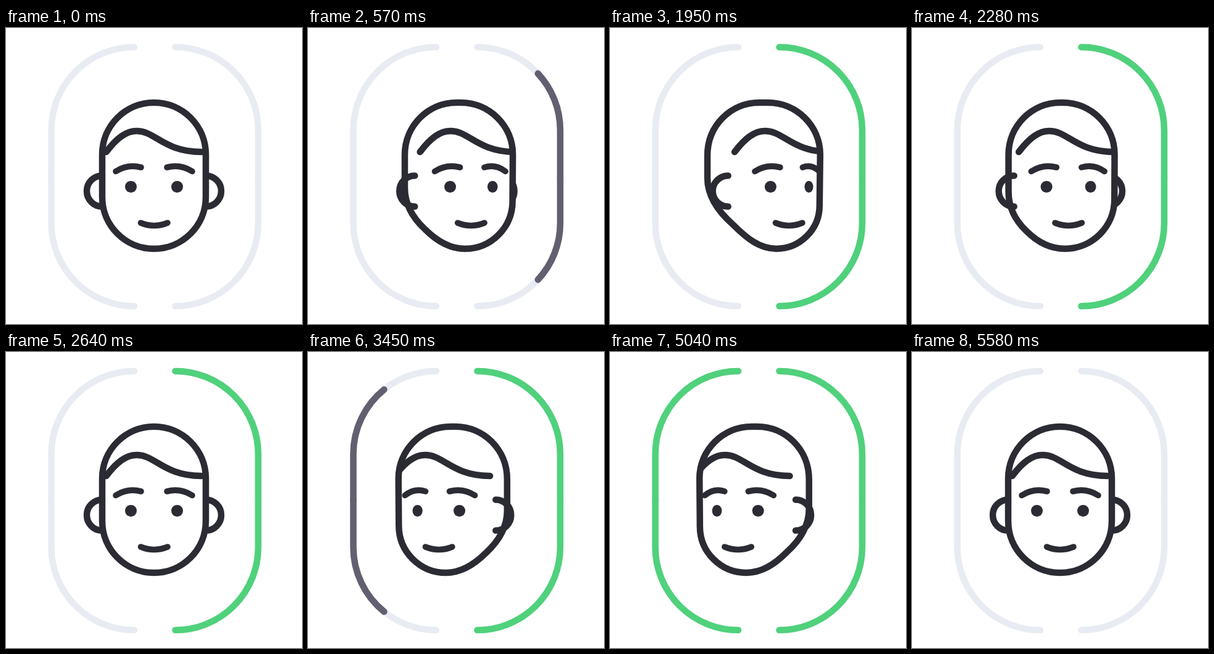
Write an HTML page that moves like this. It is 480 px wide and 480 px high and loops after 5850 ms.

```html
<!DOCTYPE html>
<html lang="en">
<head>
<meta charset="utf-8">
<title>Face scan</title>
<style>
  html, body { margin: 0; width: 100%; height: 100%; overflow: hidden; background: #fff; }
  svg { display: block; width: 100%; height: 100%; }
  .line { fill: none; stroke-linecap: round; stroke-linejoin: round; stroke-width: 10.5; }
  .ink { stroke: #2b2b33; }
  .thin { stroke-width: 9.6; }
  .track { stroke: #e8ecf2; }
  .eye { fill: #2b2b33; }
</style>
</head>
<body>
<svg viewBox="0 0 480 480">
  <defs>
    <path id="up" d="M409 241V165.500A134.500 134.500 0 0 0 274.500 31" pathLength="100"/>
    <path id="down" d="M409 241V316.500A134.500 134.500 0 0 1 274.500 451" pathLength="100"/>
    <clipPath id="inside"><path id="mask"/></clipPath>
  </defs>

  <g class="line track">
    <use href="#up"/><use href="#down"/>
    <g transform="translate(482.500) scale(-1 1)"><use href="#up"/><use href="#down"/></g>
  </g>
  <g class="line" id="rightArc"><use href="#up"/><use href="#down"/></g>
  <g transform="translate(482.500) scale(-1 1)">
    <g class="line" id="leftArc"><use href="#up"/><use href="#down"/></g>
  </g>

  <g id="face">
    <path id="farEar" class="line ink" d="M324 239.500A25 25 0 0 1 324 289.500"/>
    <path id="head" class="line ink" style="fill:#fff"/>
    <path id="nearEar" class="line ink" d="M156 239.500A25 25 0 0 0 156 289.500"/>
    <g clip-path="url(#inside)">
      <g id="unflip">
        <path id="hair" class="line ink" d="M162.500 201C180 178 195 167 212 167C242 167 256 201 317 201"/>
      </g>
      <path id="farBrow" class="line ink thin"/>
    </g>
    <path id="nearBrow" class="line ink thin" d="M178 232.500C190 225 204 222 219 226"/>
    <path id="nearEye" class="eye"/>
    <path id="farEye" class="eye"/>
    <path id="mouth" class="line ink thin" d="M218.500 316Q240 325 262 316"/>
  </g>
</svg>
<script>
const LOOP = 5850;
const $ = id => document.getElementById(id);
const part = Object.fromEntries(
  ['rightArc', 'leftArc', 'face', 'farEar', 'head', 'nearEar', 'unflip', 'hair', 'farBrow',
   'nearBrow', 'nearEye', 'farEye', 'mouth', 'mask'].map(id => [id, $(id)]));

const mix = (a, b, k) => a + (b - a) * k;
const ramp = (t, from, to) => Math.min(1, Math.max(0, (t - from) / (to - from)));

// cubic-bezier(.33, 0, .3, 1), solved by bisection
function ease(x) {
  if (x <= 0 || x >= 1) return x <= 0 ? 0 : 1;
  let lo = 0, hi = 1, s = .5;
  for (let i = 0; i < 24; i++) {
    s = (lo + hi) / 2;
    const r = 1 - s;
    if (.99 * r * r * s + .9 * r * s * s + s * s * s < x) lo = s; else hi = s;
  }
  return s * s * (3 - 2 * s);
}

// Head outline facing forward and fully turned, as matching points
const FRONT = [156,205, 156,158.6, 193.6,121, 240,121, 240,121, 286.4,121, 324,158.6, 324,205,
  324,274, 324,320.4, 286.4,358, 240,358, 216.8,358, 195.8,348.6, 180.6,333.4,
  165.4,318.2, 156,297.2, 156,274];
const TURNED = [158,207, 158,158, 196,121, 242,121, 256,121, 303,121, 341,159, 341,205,
  340,288, 340,327, 308,358, 270,358, 243,358, 222,341, 200,319,
  176,298, 158,273, 158,243];
const COMMANDS = { 0: 'M', 1: 'C', 4: 'L', 5: 'C', 8: 'L', 9: 'C', 12: 'C', 15: 'C' };

function headPath(k) {
  let d = '';
  for (let i = 0; i < FRONT.length; i += 2) {
    const x = mix(FRONT[i], TURNED[i], k), y = mix(FRONT[i + 1], TURNED[i + 1], k);
    d += (COMMANDS[i / 2] || ' ') + x.toFixed(2) + ' ' + y.toFixed(2);
  }
  return d + 'Z';
}

function eyePath(x, rx, squint) {
  const y = 257.5, ry = mix(9.5, 8.8, squint), top = mix(9.5, 4.7, squint);
  const w = rx * mix(.552, .86, squint), h = top * mix(.552, .9, squint);
  return `M${x - rx} ${y}C${x - rx} ${y - h} ${x - w} ${y - top} ${x} ${y - top}` +
    `S${x + rx} ${y - h} ${x + rx} ${y}A${rx} ${ry} 0 0 1 ${x - rx} ${y}Z`;
}

const shift = (el, x) => el.setAttribute('transform', `translate(${x.toFixed(2)})`);
const shape = (el, d) => el.setAttribute('d', d);

const SLATE = [98, 96, 112], GREEN = [80, 209, 124];

function drawArc(el, grow, tint, opacity) {
  el.style.display = grow > 0 && opacity > 0 ? '' : 'none';
  el.style.opacity = opacity;
  el.style.stroke = `rgb(${SLATE.map((c, i) => Math.round(mix(c, GREEN[i], tint)))})`;
  el.style.strokeDasharray = grow < 1 ? `${grow * 100} 300` : 'none';
}

function render(t) {
  const right = ease(ramp(t, 255, 1155)) - ease(ramp(t, 1908, 2658));
  const left = ease(ramp(t, 3105, 4005)) - ease(ramp(t, 4818, 5568));
  const k = right + left;
  const squint = ramp(t, 700, 950) - ramp(t, 1610, 1790) +
    ramp(t, 3580, 3830) - ramp(t, 4520, 4700);

  const flip = left > 0 ? 'translate(480) scale(-1 1)' : '';
  part.face.setAttribute('transform', flip);
  part.unflip.setAttribute('transform', flip);

  const outline = headPath(k);
  shape(part.head, outline);
  shape(part.mask, outline);
  shift(part.hair, 40 * (right - left));
  shift(part.nearEar, 36 * k);
  shift(part.farEar, -30 * k);
  shift(part.nearBrow, 57.5 * k);
  shift(part.mouth, 50.5 * k);

  const a = 261 + 52 * k, b = 302 + 38 * k;
  shape(part.farBrow, `M${a} 226C${mix(a, b, .366)} 222 ${mix(a, b, .707)} 225 ${b} 232.5`);
  shape(part.nearEye, eyePath(202.5 + 58.5 * k, 9.5, squint));
  shape(part.farEye, eyePath(277.5 + 45.5 * k, 9.5 - 2.5 * k, squint));

  const opacity = 1 - ramp(t, 5115, 5560);
  drawArc(part.rightArc, ease(ramp(t, 255, 1005)), ramp(t, 750, 1410), opacity);
  drawArc(part.leftArc, ease(ramp(t, 3105, 3855)), ramp(t, 3630, 4290), opacity);
}

const start = performance.now();
function tick() {
  render((performance.now() - start) % LOOP);
  requestAnimationFrame(tick);
}
render(0);
requestAnimationFrame(tick);
</script>
</body>
</html>
```
